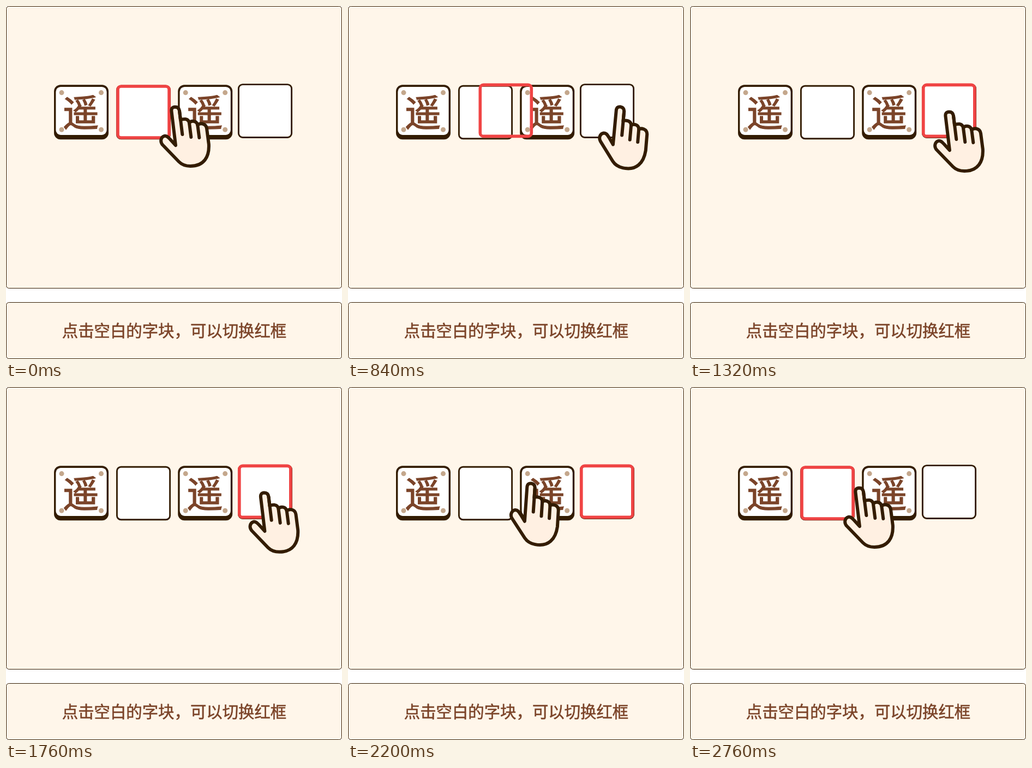
An HTML page that plays this animation: 616 px wide and 646 px high, repeating every 3.24 s.

```html
<!DOCTYPE html>
<html lang="zh-CN">
<head>
<meta charset="utf-8">
<title>切换红框</title>
<style>
  html, body { margin: 0; width: 100%; height: 100%; overflow: hidden; background: #fff; }
  svg { display: block; width: 616px; height: 646px; }
  text { font-family: "Noto Sans CJK SC", "Noto Sans CJK", sans-serif; fill: #7b4429; stroke: #7b4429; text-anchor: middle; }
  .panel { fill: #fff6ea; stroke: #331c02; }
  .blank { fill: #fff; stroke: #331c02; stroke-width: 2.9; }
  .hand { stroke: #331c02; stroke-width: 6; stroke-linecap: round; stroke-linejoin: round; }
</style>
</head>
<body>
<svg viewBox="0 0 616 646">
  <defs>
    <g id="tile">
      <rect width="100" height="100" rx="12" fill="#331c02"/>
      <rect x="3.4" y="3.6" width="93.2" height="88" rx="9" fill="#fff"/>
      <g fill="#c4a78c">
        <circle cx="14" cy="14.3" r="4.5"/>
        <circle cx="86.5" cy="14.3" r="4.5"/>
        <circle cx="14" cy="82" r="4.5"/>
        <circle cx="86.5" cy="82" r="4.5"/>
      </g>
      <text x="49.3" y="75.6" font-size="66.5" stroke-width="1.3">遥</text>
    </g>
  </defs>
  <rect class="panel" x=".5" y=".5" width="615" height="516" rx="5"/>
  <rect class="panel" x=".5" y="542.5" width="615" height="103" rx="5"/>
  <text x="308.5" y="604.5" font-size="29.4" stroke-width=".55">点击空白的字块，可以切换红框</text>

  <use href="#tile" x="88" y="144.3"/>
  <rect class="blank" x="203.4" y="146.2" width="97.2" height="96.6" rx="7.5"/>
  <use href="#tile" x="315.2" y="144.3"/>
  <rect class="blank" x="426.4" y="143.6" width="97.2" height="96.9" rx="7.5"/>

  <circle id="ripple" fill="#ff2a44"/>
  <rect id="frame" x="205" y="147" width="94" height="94" rx="6" fill="none" stroke="#f04444" stroke-width="5.6"/>
  <g id="hand" class="hand">
    <path fill="#fff0e2" d="M311 255L303.5 193Q302.5 185 310 184.7Q317 184.7 318 192L320 209
      Q323 206.5 329 207Q335 208 336 214Q339 210 344.5 211Q350 212 351.3 218Q354 214.7 360 215.5
      Q367 217 368 224L371.8 253C373 276 363 293 338 293C327 293 321 289 317 285L287 254
      C282 248 284 240 290 238C295 236.8 298 241 301 244Z"/>
    <path fill="none" d="M318 192L323.3 235M336 214L339.3 240M351.3 218L354.3 241"/>
  </g>
</svg>
<script>
const LOOP = 3240, TILT = 12.4;
const GO = 280, RETURN = 1730;
const hand = document.getElementById('hand');
const frame = document.getElementById('frame');
const ripple = document.getElementById('ripple');

const ramp = (t, from, to) => Math.min(1, Math.max(0, (t - from) / (to - from)));
const smooth = (t, from, to) => {
  const u = ramp(t, from, to);
  return u * u * (3 - 2 * u);
};
const travel = (t, start) => smooth(t, start, start + 520);
// Tilts while travelling, then drops back to press.
const tilt = (t, start) => smooth(t, start, start + 600) - smooth(t, start + 600, start + 750);

function drawRipple(t) {
  const back = t > RETURN;
  const start = back ? 2320 : 880;
  const u = ramp(t, start, start + 440);
  ripple.setAttribute('cx', back ? 241.5 : 474);
  ripple.setAttribute('cy', 198.5);
  ripple.setAttribute('r', 50 * (1 - (1 - u) ** 2));
  ripple.setAttribute('opacity', u > 0 ? 0.21 * (1 - u) : 0);
}

function draw(t) {
  const move = travel(t, GO) - travel(t, RETURN);
  const angle = TILT * (tilt(t, GO) + tilt(t, RETURN));
  hand.setAttribute('transform',
    `translate(${165 * move} ${9 * move}) rotate(${angle} 365 296)`);

  const slideBack = ramp(t, 2360, 2600);
  const slide = ramp(t, 800, 1045) - slideBack;
  const lift = ramp(t, 800, 840) - slideBack;
  frame.setAttribute('transform', `translate(${222.8 * slide} ${-2.6 * lift})`);
  drawRipple(t);
}

const begin = performance.now();
function tick() {
  draw((performance.now() - begin) % LOOP);
  requestAnimationFrame(tick);
}
tick();
</script>
</body>
</html>
```
